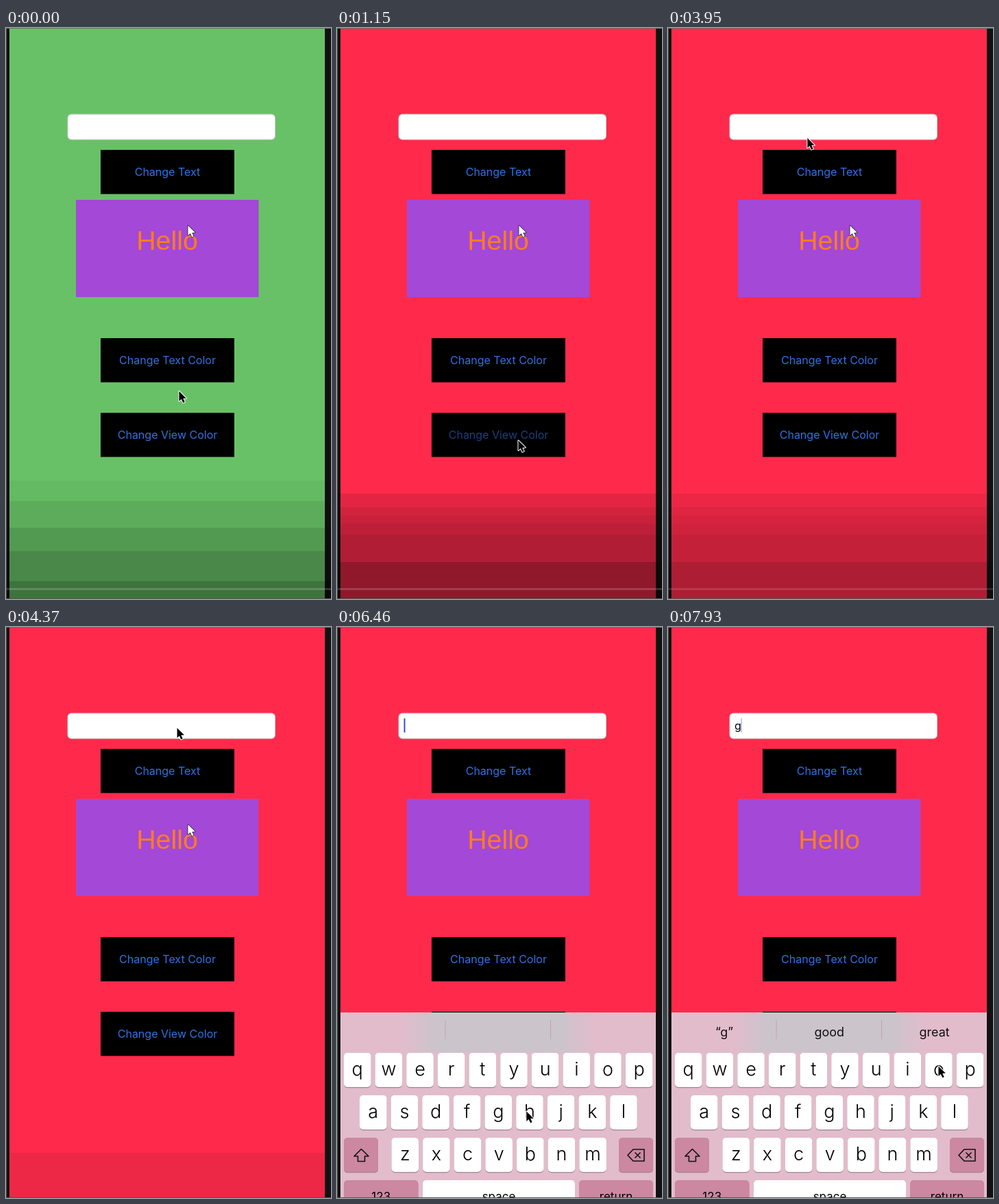
These frames come from a looping animation (474x834 px, 8 s). An HTML page with a canvas:

```html
<!DOCTYPE html>
<html lang="en">
<head>
<meta charset="utf-8">
<title>Colour and text demo</title>
<style>
html, body { margin: 0; width: 100%; height: 100%; overflow: hidden; background: #111; }
canvas { display: block; width: 474px; height: 834px; }
</style>
</head>
<body>
<canvas id="stage" width="474" height="834"></canvas>
<script>
const ctx = document.getElementById('stage').getContext('2d');
const W = 474, H = 834, LOOP = 8000;
const SANS = 'Inter, Roboto, sans-serif';
const GREEN = '#68c167', RED = '#ff2a4b', BLUE = '#2f73e4';
const PANEL = '#e2bccb', HAZE = '#cbc4cb', MOD_KEY = '#cb88a0';
const RED_AT = 1150, SHADE_GONE = 4370, FOCUS_AT = 4510, KEYS_AT = 4890, TYPED_AT = 7330;
const KEYS_TOP = 563;

// Where the pointer turns or rests: [time, x, y].
const PATH = [
  [0, 252, 530], [600, 264, 602], [1900, 264, 602], [2280, 187, 498],
  [2670, 68, 412], [2790, 119, 405], [3050, 156, 330], [3540, 135, 180],
  [4230, 249, 147], [5670, 250, 147], [6190, 281, 640], [6460, 276, 707],
  [6820, 238, 714], [7250, 238, 714], [7850, 394, 641]
];

const clamp = v => Math.min(1, Math.max(0, v));
const ramp = (t, from, to) => clamp((t - from) / (to - from));
const mix = (a, b, k) => a + (b - a) * k;

function pointer(t) {
  const i = PATH.findIndex(p => p[0] > t);
  if (i < 0) return PATH.at(-1).slice(1);
  const [t0, x0, y0] = PATH[i - 1], [t1, x1, y1] = PATH[i];
  const k = ramp(t, t0, t1);
  return [mix(x0, x1, k), mix(y0, y1, k)];
}

function rect(x, y, w, h, fill) {
  ctx.fillStyle = fill;
  ctx.fillRect(x, y, w, h);
}

function round(x, y, w, h, r, fill) {
  ctx.beginPath();
  ctx.roundRect(x, y, w, h, r);
  ctx.fillStyle = fill;
  ctx.fill();
}

function label(str, x, y, size, fill, { align = 'center', family = SANS, weight = 400 } = {}) {
  ctx.font = `${weight} ${size}px ${family}`;
  ctx.textAlign = align;
  ctx.fillStyle = fill;
  ctx.fillText(str, x, y);
}

function trace(points, closed = true) {
  ctx.beginPath();
  points.forEach(([x, y]) => ctx.lineTo(x, y));
  if (closed) ctx.closePath();
}

function arrow(x, y, fill, outline, width) {
  ctx.save();
  ctx.translate(x, y);
  ctx.scale(.93, .93);
  trace([[.5, .5], [.5, 16], [4, 12.8], [6.7, 18.6], [9.4, 17.4], [6.8, 11.8], [11.6, 11.6]]);
  ctx.lineJoin = 'round';
  ctx.lineWidth = width;
  ctx.strokeStyle = outline;
  ctx.stroke();
  ctx.fillStyle = fill;
  ctx.fill();
  ctx.restore();
}

function button(text, y, alpha = 1) {
  rect(138, y, 195, 64.5, '#000');
  ctx.globalAlpha = alpha;
  label(text, 235.5, y + 38, 16, BLUE);
  ctx.globalAlpha = 1;
}

function caretAlpha(t) {
  if (t >= TYPED_AT) return 1 - .85 * ramp(t, TYPED_AT + 480, TYPED_AT + 630);
  const age = (t - KEYS_AT) % 1240;
  return 1 - ramp(age, 700, 850) + ramp(age, 1090, 1240);
}

function field(t) {
  round(89.5, 125.5, 303.5, 38, 6, '#c9c9c9');
  round(90.5, 126.5, 301.5, 36, 5, '#fff');
  if (t < KEYS_AT) return;
  const typed = t >= TYPED_AT;
  if (typed) label('g', 97, 150, 16, '#000', { align: 'left' });
  ctx.globalAlpha = caretAlpha(t);
  rect(typed ? 106 : 97.5, 133.5, 2, 20.5, '#3949cf');
  ctx.globalAlpha = 1;
}

function key(x, y, w, fill = '#fff') {
  round(x, y + 1.2, w, 50, 5, '#a5838f');
  round(x, y, w, 50, 5, fill);
}

function letterRow(letters, x, y) {
  [...letters].forEach((c, i) => {
    const left = x + i * 45.65;
    key(left, y, 39.5);
    label(c, left + 19.75, y + 33, 27, '#000', { weight: 300 });
  });
}

function wordKey(text, x, y, w, fill) {
  key(x, y, w, fill);
  label(text, x + w / 2, y + 30, 17, '#000');
}

function shiftIcon(x, y) {
  trace([[x, y - 9], [x + 10.5, y + 1.5], [x + 5, y + 1.5], [x + 5, y + 9],
    [x - 5, y + 9], [x - 5, y + 1.5], [x - 10.5, y + 1.5]]);
  ctx.stroke();
}

function deleteIcon(x, y) {
  trace([[x - 12, y], [x - 4, y - 8.5], [x + 12, y - 8.5], [x + 12, y + 8.5], [x - 4, y + 8.5]]);
  ctx.stroke();
  for (const s of [-1, 1]) {
    trace([[x - 1.5, y - 4 * s], [x + 6.5, y + 4 * s]], false);
    ctx.stroke();
  }
}

function suggestions(top, typed) {
  // The covered button shows through the bar as a soft grey patch.
  const haze = ctx.createLinearGradient(95, 0, 377, 0);
  [[0, PANEL], [.18, HAZE], [.82, HAZE], [1, PANEL]].forEach(s => haze.addColorStop(...s));
  rect(95, top, 282, 58, haze);
  for (const x of [157.5, 311]) rect(x, top + 11, 1, 28, '#bda5b0');
  if (!typed) return;
  ['“g”', 'good', 'great'].forEach((word, i) =>
    label(word, 82 + i * 153.3, top + 35, 18, '#111'));
}

function keyboard(t) {
  const left = 1 - ramp(t, 4850, 5685);
  const top = mix(KEYS_TOP, H, left ** 3);
  ctx.save();
  ctx.beginPath();
  ctx.rect(5, top, 460, H - top);
  ctx.clip();
  rect(5, top, 460, H - top, PANEL);
  suggestions(top, t >= TYPED_AT);

  letterRow('qwertyuiop', 10, top + 59);
  letterRow('asdfghjkl', 33, top + 121);
  letterRow('zxcvbnm', 79.5, top + 183);
  key(10, top + 183, 50, MOD_KEY);
  key(411, top + 183, 50, MOD_KEY);
  ctx.strokeStyle = '#111';
  ctx.lineWidth = 1.6;
  ctx.lineJoin = 'round';
  shiftIcon(35.5, top + 208.5);
  deleteIcon(436, top + 208.5);

  wordKey('123', 10, top + 245, 108.5, MOD_KEY);
  wordKey('space', 125, top + 245, 222, '#fff');
  wordKey('return', 353, top + 245, 108, MOD_KEY);
  ctx.restore();
}

// Dark ramp behind the player controls, broken into visible bands.
function shade(t) {
  const fade = 1 - ramp(t, 3800, SHADE_GONE);
  const green = t < RED_AT;
  const edges = green ? [661, 691, 730, 764, 808] : [680, 700, 712, 724, 740, 780];
  const slope = green ? .0025 : .0033;
  edges.forEach((y, i) => {
    const end = edges[i + 1] ?? H;
    rect(0, y, W, end - y, `rgba(0,0,0,${(y - 647) * slope * fade})`);
  });
  if (t >= SHADE_GONE && t < FOCUS_AT) rect(5, 768, 460, 66, 'rgba(0,0,0,.07)');
  rect(0, 818, W, 3, `rgba(255,255,255,${.17 * fade})`);
}

function draw(t) {
  const pressed = ramp(t, 820, 1000) - ramp(t, 1180, 1400);
  rect(0, 0, W, H, '#111');
  rect(5, 0, 460, H, t < RED_AT ? GREEN : RED);
  field(t);
  button('Change Text', 178);
  rect(102, 251, 266.5, 142, '#a348d7');
  label('Hello', 235, 324, 39.3, '#fd7d1d', { family: '"Liberation Sans", Arial, sans-serif' });
  button('Change Text Color', 453);
  button('Change View Color', 562, 1 - .45 * pressed);
  shade(t);
  if (t >= KEYS_AT) keyboard(t);
  rect(0, 0, W, 1, '#6b6b6b');
  rect(0, 0, 1, H, '#5a5a5a');
  rect(0, H - 1, W, 1, '#555');
  if (t < FOCUS_AT) arrow(265, 288, '#fff', '#222', 1.6);
  arrow(...pointer(t), '#000', '#fff', 2.2);
}

const start = performance.now();
function tick() {
  draw(Math.max(0, performance.now() - start) % LOOP);
  requestAnimationFrame(tick);
}
tick();
</script>
</body>
</html>
```
